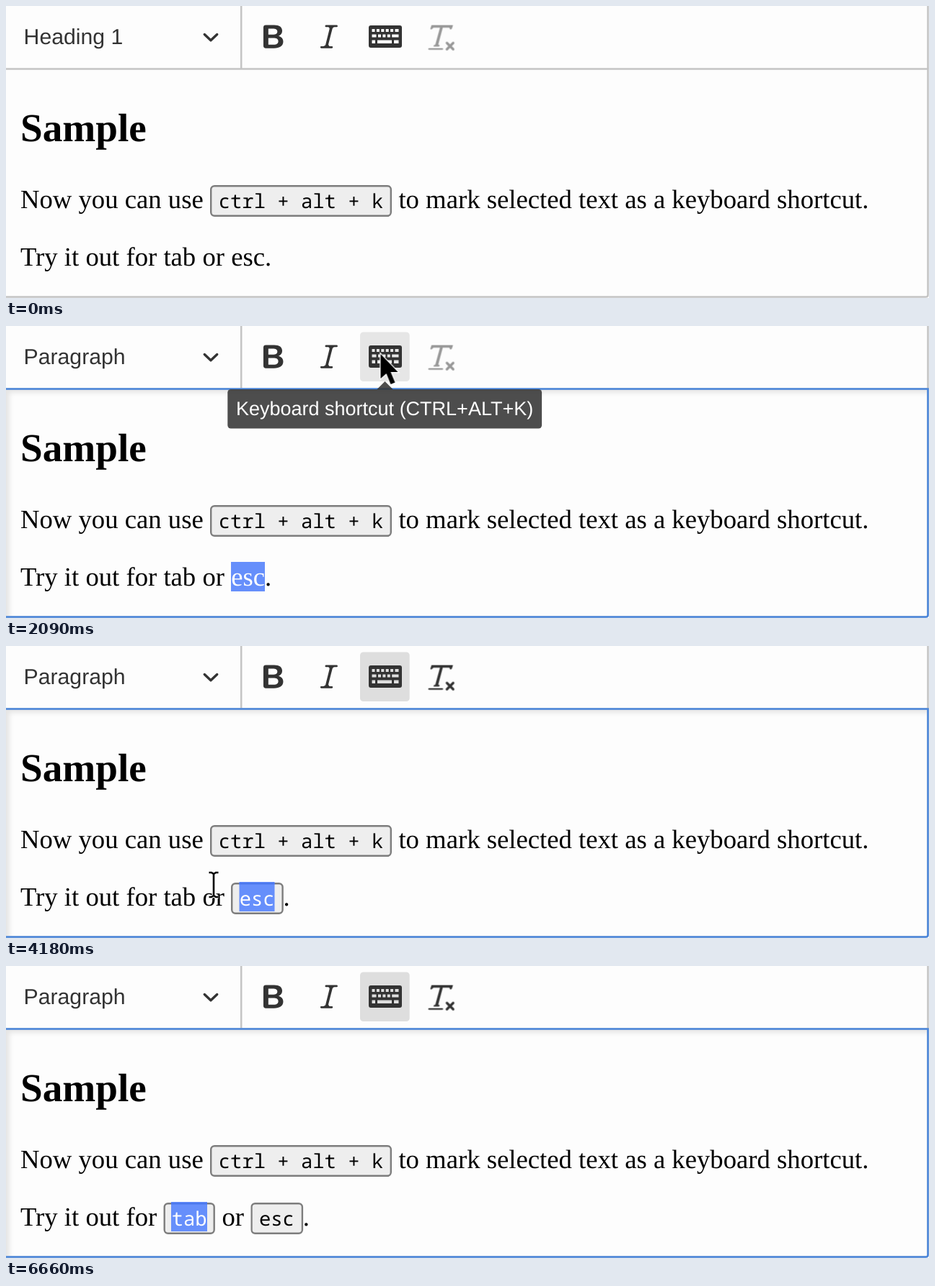
Animation, 1280 px wide and 406 px high, one loop 8600 ms. Source, as an HTML page:

```html
<!DOCTYPE html>
<html lang="en">
<head>
<meta charset="utf-8">
<title>Keyboard shortcut editor</title>
<style>
  html, body { margin: 0; width: 100%; height: 100%; overflow: hidden; background: #fdfdfd; }
  svg { position: absolute; left: 0; top: 0; width: 1280px; height: 406px; }
  text { text-rendering: geometricPrecision; }
  .serif { font: 36.7px "Liberation Serif", "Times New Roman", serif; }
  .title { font: bold 55.2px "Liberation Serif", "Times New Roman", serif; }
  .ui { font: 30.2px "Liberation Sans", Arial, sans-serif; fill: #333; }
  .tip { font: 27px "Liberation Sans", Arial, sans-serif; fill: #fff; }
  .mono { font: 27.2px "Noto Sans Mono", "DejaVu Sans Mono", monospace; }
  .key { fill: #eee; stroke: #7d7d7d; stroke-width: 2.4; }
  .mark { fill: #668ffb; }
  .white { fill: #fff; }
  .icon { fill: #333; }
  .line { fill: none; stroke: #c4c4c4; stroke-width: 2.5; }
  .focus { stroke: #4a86dc; }
  #shade {
    position: absolute; left: 0; top: 88px; width: 1278px; height: 316px;
    box-shadow: inset 4.6px 4.6px 7px rgba(0, 0, 0, .1);
  }

  .t { animation: 8.6s step-end infinite; }
  .fade { animation: focus 8.6s linear infinite; }
  @keyframes focus {
    0%, 10.22% { opacity: 0 }
    12.55%, 25.69% { opacity: 1 }
    27.5% { opacity: .35 }
    30.2%, 100% { opacity: 1 }
  }

  /* toolbar */
  #heading { animation-name: heading }
  @keyframes heading { 0% { visibility: visible } 10.23%, 100% { visibility: hidden } }
  #para { animation-name: para }
  @keyframes para { 0% { visibility: hidden } 10.23%, 100% { visibility: visible } }
  #button { animation-name: button }
  @keyframes button {
    0% { fill: transparent }
    21.74% { fill: #e6e6e6 }
    26.97% { fill: #d9d9d9 }
    28.25% { fill: #c4c4c4 }
    37.09% { fill: #dedede }
    51.16% { fill: transparent }
    77.44%, 100% { fill: #dedede }
  }
  #clear { animation-name: clear }
  @keyframes clear {
    0% { opacity: .5 }
    28.25% { opacity: 1 }
    51.16% { opacity: .5 }
    77.44%, 100% { opacity: 1 }
  }
  #tooltip { animation-name: tooltip }
  @keyframes tooltip {
    0% { opacity: 0 }
    24.3% { opacity: .87 }
    25.69% { opacity: 1 }
    37.09% { opacity: .85 }
    38.37% { opacity: .35 }
    39.65%, 100% { opacity: 0 }
  }

  /* second paragraph */
  #escText { animation-name: escText }
  @keyframes escText { 0% { visibility: visible } 28.25%, 100% { visibility: hidden } }
  #escMark { animation-name: escMark }
  @keyframes escMark {
    0% { visibility: hidden }
    12.79% { visibility: visible }
    28.25%, 100% { visibility: hidden }
  }
  #escKey { animation-name: escKey }
  @keyframes escKey {
    0% { visibility: hidden; transform: none }
    28.25% { visibility: visible; transform: none }
    77.44%, 100% { visibility: visible; transform: translateX(27.3px) }
  }
  #escKeyMark { animation-name: escKeyMark }
  @keyframes escKeyMark {
    0% { visibility: hidden }
    28.25% { visibility: visible }
    51.16%, 100% { visibility: hidden }
  }
  #tabText { animation-name: tabText }
  @keyframes tabText { 0% { visibility: visible } 77.44%, 100% { visibility: hidden } }
  #tabMark { animation-name: tabMark }
  @keyframes tabMark {
    0% { visibility: hidden }
    67.44% { visibility: visible }
    77.44%, 100% { visibility: hidden }
  }
  #tabKey { animation-name: tabKey }
  @keyframes tabKey { 0% { visibility: hidden } 77.44%, 100% { visibility: visible } }
  #caret { animation-name: caret }
  @keyframes caret {
    0% { visibility: hidden; transform: translateX(303px) }
    51.16% { visibility: visible; transform: translateX(303px) }
    57.2% { visibility: hidden; transform: translateX(303px) }
    61.04% { visibility: visible; transform: translateX(271.6px) }
    64.88% { visibility: visible; transform: translateX(262.4px) }
    67.44%, 100% { visibility: hidden; transform: translateX(262.4px) }
  }

  /* pointers */
  #beam { animation-name: beam }
  @keyframes beam {
    0% { opacity: 0; transform: translate(592px, 342px) }
    2.32% { opacity: 1; transform: translate(592px, 342px) }
    3.6% { opacity: 1; transform: translate(522px, 325px) }
    5% { opacity: 1; transform: translate(415px, 309px) }
    6.27% { opacity: 1; transform: translate(373px, 320px) }
    7.67% { opacity: 1; transform: translate(327.7px, 338px) }
    17.9% { opacity: 1; transform: translate(346px, 308px) }
    19.18% { opacity: 1; transform: translate(420px, 190px) }
    20.46% { opacity: 0; transform: translate(420px, 190px) }
    38.37% { opacity: 1; transform: translate(455px, 108px) }
    39.65% { opacity: 1; transform: translate(432.7px, 135px) }
    40.81% { opacity: 1; transform: translate(405px, 168px) }
    42.09% { opacity: 1; transform: translate(380px, 201px) }
    43.37% { opacity: 1; transform: translate(357px, 247px) }
    44.65% { opacity: 1; transform: translate(334px, 320px) }
    46.04% { opacity: 1; transform: translate(312px, 326px) }
    47.32% { opacity: 1; transform: translate(296px, 330px) }
    48.6% { opacity: 1; transform: translate(288px, 332px) }
    51.16% { opacity: 1; transform: translate(310px, 336px) }
    52.32% { opacity: 1; transform: translate(402px, 390px) }
    53.6%, 100% { opacity: 0; transform: translate(402px, 390px) }
  }
  #arrow { animation-name: arrow }
  @keyframes arrow {
    0% { opacity: 0; transform: translate(492px, 70px) }
    20.46% { opacity: 1; transform: translate(488px, 80px) }
    21.74% { opacity: 1; transform: translate(519.5px, 39px) }
    35.81% { opacity: 1; transform: translate(513px, 45px) }
    37.09% { opacity: 1; transform: translate(484px, 74px) }
    38.37%, 100% { opacity: 0; transform: translate(484px, 74px) }
  }
</style>
</head>
<body>
<div id="shade" class="fade"></div>
<svg viewBox="0 0 1280 406">
  <!-- frame -->
  <path class="line" d="M326.2 0V87M1278.5 0V87"/>
  <path id="edge" class="line" d="M-3 87.6H1278.5V401.5Q1278.5 404.6 1275.4 404.6H-3"/>
  <path class="line focus fade" d="M-3 87.6H1278.5V401.5Q1278.5 404.6 1275.4 404.6H-3"/>

  <!-- toolbar -->
  <text id="heading" class="ui t" x="24.6" y="52.5">Heading 1</text>
  <text id="para" class="ui t" x="24.6" y="52.5">Paragraph</text>
  <path d="M275.3 39.5L284 47.8L292.7 39.5" fill="none" stroke="#333" stroke-width="3.4" stroke-linecap="round" stroke-linejoin="round"/>
  <rect id="button" class="t" x="491" y="8.4" width="68.7" height="68.7" rx="4.6"/>
  <g class="icon">
    <path transform="translate(347.8 19.7) scale(2.29)" fill-rule="evenodd"
      d="M5.5 3H10.6C13.7 3 15.4 4.3 15.4 6.5C15.4 8.1 14.5 9.1 13.2 9.6C15 10.1 16 11.3 16 13C16 15.6 13.9 17 10.4 17H5.5Q4 17 4 15.5V4.5Q4 3 5.5 3ZM7 5.1V8.75H9.6C11.5 8.75 12.45 8.2 12.45 6.9C12.45 5.6 11.5 5.1 9.6 5.1ZM7 10.8V14.9H10.1C12 14.9 13 14.2 13 12.8C13 11.4 12 10.8 10 10.8Z"/>
    <path transform="translate(425.1 19.7) scale(2.29)"
      d="M9.6 14.6Q9.6 15.4 10.3 15.8H11.7A.6.6 0 0 1 11.7 17H5.3A.6.6 0 0 1 5.3 15.8H6.5C7.4 15.6 7.7 15.4 7.9 14.9L10.3 5.3Q10.3 4.5 9.6 4.2H8.2A.6.6 0 0 1 8.2 3H14.6A.6.6 0 0 1 14.6 4.2H13.4C12.6 4.3 12.3 4.6 12 5.3Z"/>
    <path fill-rule="evenodd"
      d="M506 27H546Q549 27 549 30V55Q549 58 546 58H506Q503 58 503 55V30Q503 27 506 27Z
      M507.5 32h4v4h-4zM513.9 32h4v4h-4zM520.3 32h4v4h-4zM526.7 32h4v4h-4zM533.1 32h4v4h-4zM539.5 32h5v4h-5z
      M507.5 39.5h6v4h-6zM516 39.5h4v4h-4zM522.4 39.5h4v4h-4zM528.8 39.5h4v4h-4zM535.2 39.5h9.3v4h-9.3z
      M507.5 47.5h4.5v4.5h-4.5zM515 47.5h20v4.5h-20zM538 47.5h6.5v4.5h-6.5z"/>
    <g id="clear" class="t">
      <g transform="translate(579.8 19.7) scale(2.29)">
        <path d="M4.5 3H17.5L16.9 5Q16.6 5.6 16 5.6Q15.5 5.6 15.5 5.1C15.5 4.6 15.3 4.5 14.6 4.5H11.3L8.6 14.7Q8.6 15 9.1 15Q9.5 15.1 9.4 15.5Q9.2 16 8.7 16H6Q5.6 16 5.7 15.5Q5.9 15 6.3 15Q6.8 15 6.8 14.8L9.6 4.5H6.3C5.5 4.5 5.4 4.6 5.1 5.1Q4.8 5.6 4.2 5.6Q3.7 5.6 3.8 5Z"/>
        <path d="M3 17.5H11" stroke="#333" stroke-linecap="round"/>
        <path d="M13.8 13.8L17.6 17.6M17.6 13.8L13.8 17.6" stroke="#333" stroke-width="1.5" stroke-linecap="round"/>
      </g>
    </g>
  </g>

  <!-- content -->
  <text class="title" x="20" y="188">Sample</text>
  <g class="serif">
    <text x="20" y="281">Now you can use</text>
    <rect class="key" x="284.2" y="250.2" width="249.6" height="41.6" rx="5"/>
    <text class="mono" x="294.7" y="281">ctrl + alt + k</text>
    <text x="544.4" y="281">to mark selected text as a keyboard shortcut.</text>

    <text x="20" y="361">Try it out for</text>
    <g id="tabText" class="t">
      <text x="218.4" y="361">tab or</text>
    </g>
    <g id="tabMark" class="t">
      <rect class="mark" x="218" y="328" width="46" height="41"/>
      <text class="white" x="218.4" y="361">tab</text>
    </g>
    <g id="tabKey" class="t">
      <rect class="key" x="219.7" y="330.2" width="69" height="41.6" rx="5"/>
      <rect class="mark" x="229" y="328" width="50" height="41"/>
      <path d="M229 330.2H279" stroke="#4b78ee" stroke-width="2.4"/>
      <text class="mono white" x="229.7" y="361">tab</text>
      <text x="299.5" y="361">or</text>
    </g>
    <g id="escText" class="t">
      <text x="312.2" y="361">esc.</text>
    </g>
    <g id="escMark" class="t">
      <rect class="mark" x="312" y="328" width="47" height="41"/>
      <text class="white" x="312.2" y="361">esc</text>
    </g>
    <g id="escKey" class="t">
      <rect class="key" x="313.2" y="330.2" width="70.4" height="41.6" rx="5"/>
      <text class="mono" x="323.7" y="361">esc</text>
      <text x="384.4" y="361">.</text>
    </g>
    <g id="escKeyMark" class="t">
      <rect class="mark" x="323.5" y="328" width="49" height="41"/>
      <path d="M323.5 330.2H372.5" stroke="#4b78ee" stroke-width="2.4"/>
      <text class="mono white" x="323.7" y="361">esc</text>
    </g>
  </g>
  <rect id="caret" class="t" y="328" width="2" height="41"/>

  <g id="tooltip" class="t">
    <path d="M514 88.5L525.5 77L537 88.5Z" fill="#333"/>
    <rect x="307.3" y="88" width="435.8" height="54.5" rx="4.6" fill="#333"/>
    <text class="tip" x="319" y="123.5">Keyboard shortcut (CTRL+ALT+K)</text>
  </g>

  <!-- pointers -->
  <g id="beam" class="t" fill="none">
    <path d="M-6.5 -17H-3L0 -15L3 -17H6.5M0 -15V15M-6.5 17H-3L0 15L3 17H6.5" stroke="#fff" stroke-width="4.6"/>
    <path d="M-6.5 -17H-3L0 -15L3 -17H6.5M0 -15V15M-6.5 17H-3L0 15L3 17H6.5" stroke="#000" stroke-width="2.6"/>
  </g>
  <path id="arrow" class="t" d="M0 0V34L8 27L14 42L20 39.5L14 25H24Z" stroke="#fff" stroke-width="2.4" paint-order="stroke"/>
</svg>
</body>
</html>
```
